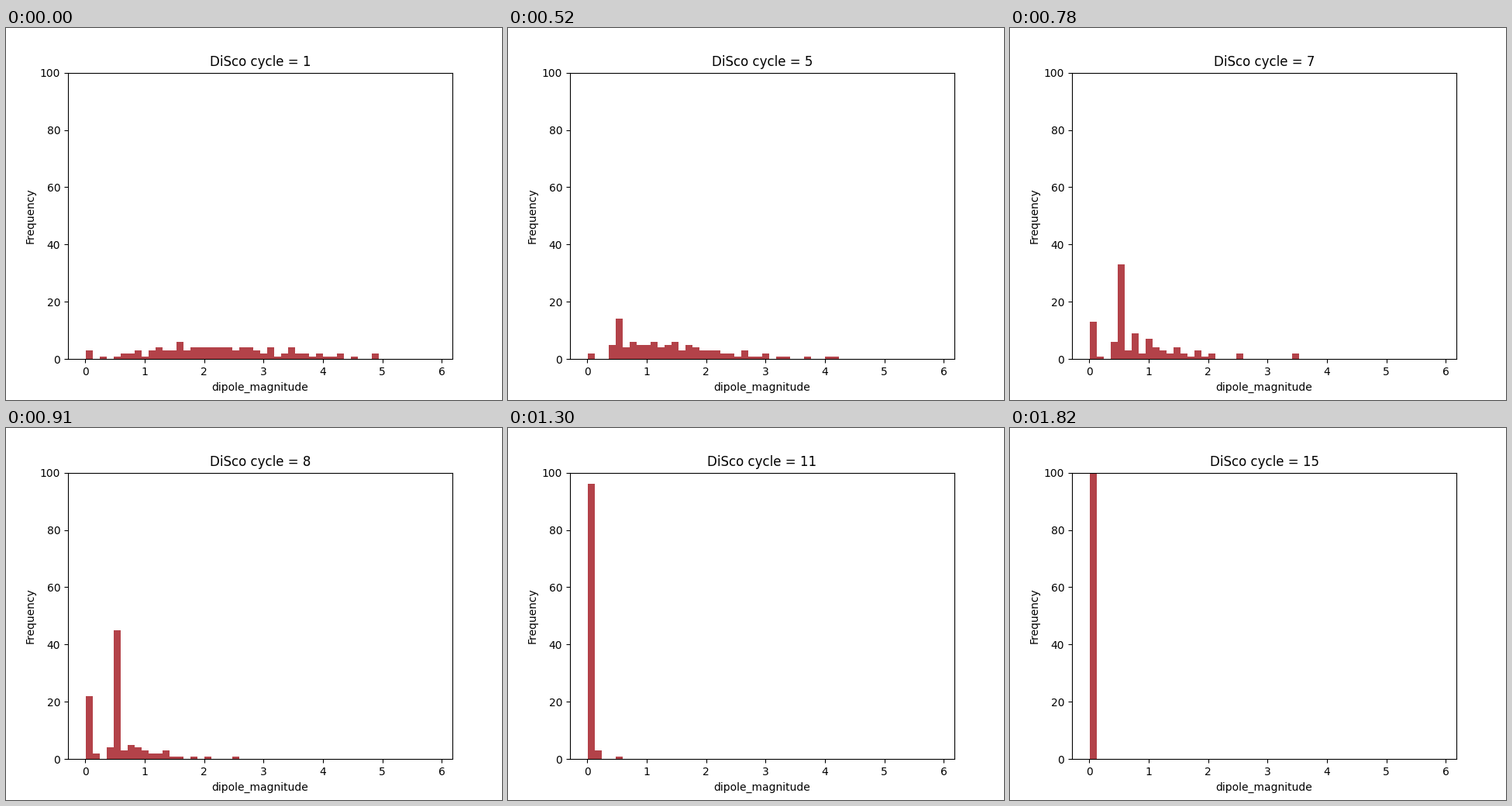
Recreate the animation shown at these times as a matplotlib script. Size 640x480 px, loop 1.95 s.

```python
import numpy as np
import matplotlib.pyplot as plt
from matplotlib.animation import FuncAnimation

LO, HI = 0.002, 5.8855      # range covered by the bins
BINS = 50
CYCLES = 15
STEP_MS = 130
MOLECULES = 100
TRAP = 0.53                 # magnitude where molecules gather half-way

KEY_CYCLES = [1, 3, 6, 8, 9, 11, 13]
SETTLED = [3, 1, 3, 24, 74, 99, 100]
TRAPPED = [0, 1, 15, 38, 8, 1, 0]


def weibull(u, scale, shape=1.0):
    """Quantile function of the Weibull distribution."""
    return scale * (-np.log(1 - u)) ** (1 / shape)


def dipoles(cycle):
    """Magnitudes of all molecules: settled near zero, trapped, or still free."""
    settled, trapped = (int(round(np.interp(cycle, KEY_CYCLES, values)))
                        for values in (SETTLED, TRAPPED))
    free = MOLECULES - settled - trapped

    ranks = np.arange(settled) + 0.5
    near_zero = LO + weibull(ranks / settled,
                             np.interp(cycle, [9, 13], [0.047, 0.018]))

    noise = np.random.default_rng(cycle).uniform(-1.5, 1.5, free)
    ranks = np.clip(np.arange(free) + 0.5 + noise, 0.5, free - 0.5)
    start = np.interp(cycle, [3, 6], [0.1, 0.35])
    scale = np.interp(cycle, [1, 3, 6, 8], [2.55, 2.2, 1.05, 0.65])
    shape = np.interp(cycle, [3, 6], [2.2, 1.2])
    spread = start + weibull(ranks / free, scale, shape)

    return np.concatenate([near_zero, np.full(trapped, TRAP), spread])


fig, ax = plt.subplots(figsize=(6.4, 4.8), dpi=100)
edges = np.linspace(LO, HI, BINS + 1)
bars = ax.bar(edges[:-1], np.zeros(BINS), width=np.diff(edges), align="edge",
              color="#b34249")
margin = 0.05 * (HI - LO)
ax.set_xlim(LO - margin, HI + margin)
ax.set_ylim(0, 100)
ax.set_xlabel("dipole_magnitude")
ax.set_ylabel("Frequency")
title = ax.set_title("")


def update(i):
    cycle = i + 1
    counts, _ = np.histogram(dipoles(cycle), bins=edges)
    for bar, count in zip(bars, counts):
        bar.set_height(count)
    title.set_text(f"DiSco cycle = {cycle}")
    return [*bars, title]


anim = FuncAnimation(fig, update, frames=CYCLES, init_func=lambda: update(0),
                     interval=STEP_MS, repeat=True, repeat_delay=0, blit=False)
plt.show()
```
